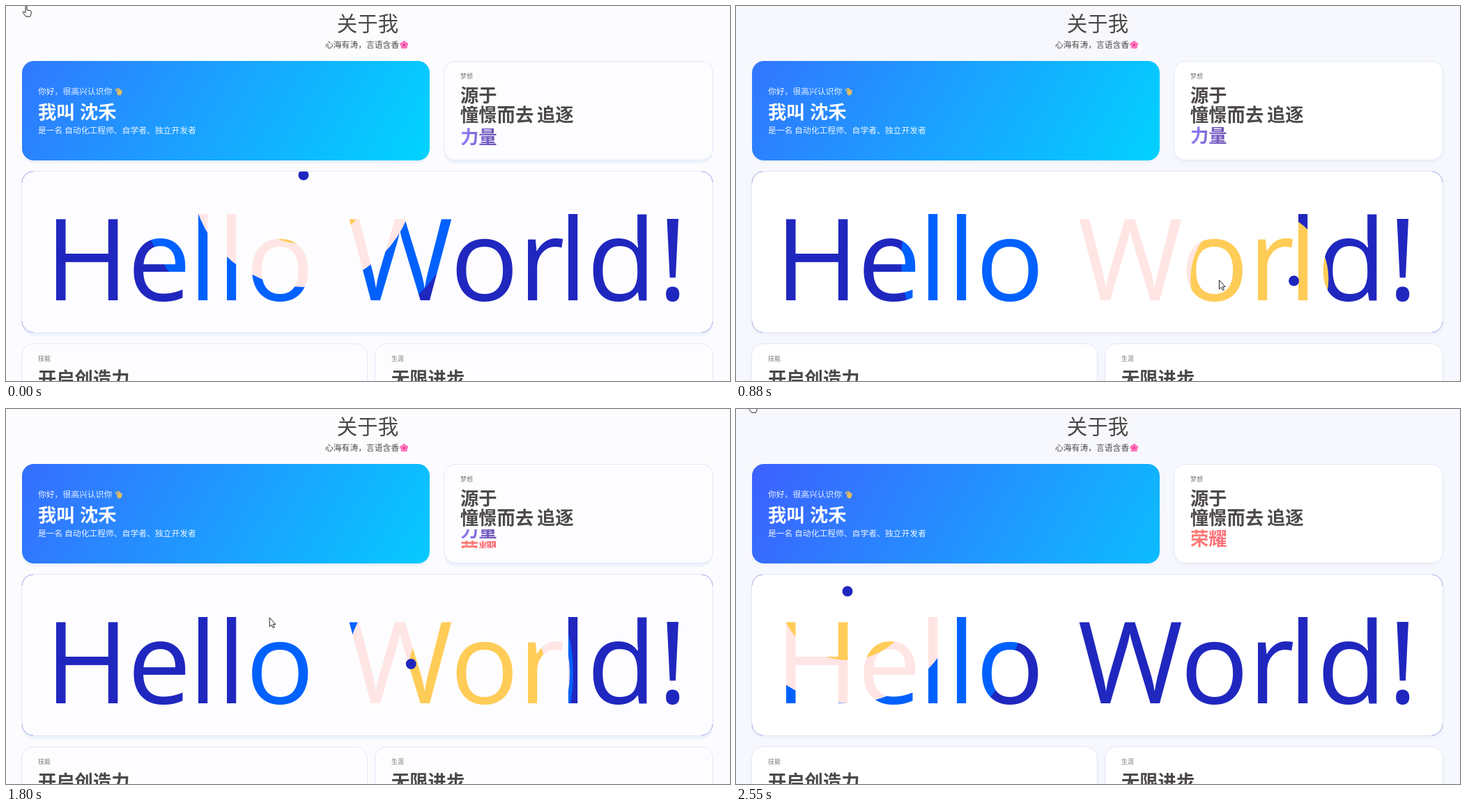
Animation of 1039 by 539 pixels, one loop 2.63 s. Source, as an HTML page:

```html
<!DOCTYPE html>
<html lang="zh-CN">
<head>
<meta charset="utf-8">
<title>关于我</title>
<style>
  html, body { margin: 0; width: 100%; height: 100%; overflow: hidden; }
  body {
    position: relative;
    background: var(--page);
    font-family: "Noto Sans CJK SC", "Noto Sans CJK", sans-serif;
    animation: tint 2630ms step-end infinite;
  }
  @keyframes tint {
    0%, 45.6% { --page: #fcfcff; --card: #fdfdff; --shade: 0 5px 2px -1px #edf2fb; }
    15.2%, 88.2%, 100% { --page: #f7f8fe; --card: #fff; --shade: 0 3px 5px -1px #eceef6; }
  }
  .card {
    position: absolute;
    box-sizing: border-box;
    border: 1px solid #e3e8f7;
    border-radius: 17px;
    background: var(--card);
    box-shadow: var(--shade);
  }
  .hero {
    border: 0;
    background: linear-gradient(120deg, #5b27ff, #00d4ff) 100% 50% / 200% 100%;
    animation: drift 2630ms cubic-bezier(.5, 0, .9, .6) infinite;
  }
  @keyframes drift { to { background-position: 68% 50%; } }

  svg { position: absolute; left: 0; top: 0; }
  .ink { fill: #4c4948; }
  .big { font-size: 26.3px; font-weight: 700; }
  .mid { font-size: 11.8px; }
  .tip { font-size: 9px; fill: #7a7877; }
  .hero-text { fill: #fff; }
  .hello { font: 400 163px "Open Sans", "Noto Sans", sans-serif; }
  .roll { animation: roll 2630ms infinite; }
  @keyframes roll {
    0% { transform: translateY(2.5px); animation-timing-function: ease-out; }
    4%, 65.4% { transform: none; animation-timing-function: ease-in-out; }
    68.44% { transform: translateY(-11.8px); animation-timing-function: ease-out; }
    75%, 100% { transform: translateY(-28px); }
  }
</style>
</head>
<body>
<div class="card hero" style="left:22.6px;top:79px;width:585px;height:143px"></div>
<div class="card" style="left:628px;top:79px;width:387px;height:143px"></div>
<div class="card" style="left:22px;top:237px;width:993px;height:233px"></div>
<div class="card" style="left:22px;top:485px;width:497px;height:143px"></div>
<div class="card" style="left:529px;top:485px;width:486px;height:143px"></div>

<svg width="1039" height="539" viewBox="0 0 1039 539">
  <defs>
    <linearGradient id="violet"><stop stop-color="#9184ff"/><stop offset="1" stop-color="#674bab"/></linearGradient>
    <linearGradient id="coral"><stop stop-color="#ff7d70"/><stop offset="1" stop-color="#f96b78"/></linearGradient>
    <clipPath id="letters">
      <text class="hello" y="423" x="56 174.2 262 303 344 440 490.5 637.4 735 793 833.5 935">Hello World!</text>
    </clipPath>
    <clipPath id="panel"><rect x="23" y="238" width="991" height="231" rx="17"/></clipPath>
    <clipPath id="slot"><rect x="645" y="173" width="80" height="27"/></clipPath>
  </defs>

  <g class="ink">
    <text x="519" y="36" font-size="29.5" text-anchor="middle">关于我</text>
    <text class="mid" x="458" y="60.3">心海有涛，言语含香</text>
  </g>
  <g id="flower" transform="translate(571.3 56)"><circle r="1.6" fill="#d8347f"/></g>

  <g class="hero-text">
    <text class="mid" x="46" y="127.3" opacity=".9">你好，很高兴认识你</text>
    <text class="big" x="46" y="161.8">我叫</text>
    <text class="big" x="106" y="161.8">沈禾</text>
    <text class="mid" x="46" y="183.3" opacity=".9">是一名 自动化工程师、自学者、独立开发者</text>
  </g>
  <path d="M157.5 120l3 4M159.5 118.6l3 4M162 118.8l2 3.5M165.5 121v4" fill="none"
        stroke="#e2bb62" stroke-width="1.7" stroke-linecap="round"/>
  <ellipse cx="162.6" cy="125" rx="3.2" ry="3.6" fill="#e2bb62"/>

  <text class="tip" x="652" y="103.6">梦想</text>
  <text class="tip" x="46" y="510">技能</text>
  <text class="tip" x="553" y="510">生涯</text>
  <g class="ink big">
    <text x="652" y="138">源于</text>
    <text x="652" y="166.4">憧憬而去</text>
    <text x="762" y="166.4">追逐</text>
    <text x="46" y="544.5">开启创造力</text>
    <text x="553" y="544.5">无限进步</text>
  </g>
  <g clip-path="url(#slot)">
    <g class="roll big">
      <text x="652" y="196" fill="url(#violet)">力量</text>
      <text x="652" y="224" fill="url(#coral)">荣耀</text>
    </g>
  </g>

  <path d="M23 254a16 16 0 0 1 16-16M998 238a16 16 0 0 1 16 16M1014 453a16 16 0 0 1-16 16M39 469a16 16 0 0 1-16-16"
        fill="none" stroke="#2027bf" stroke-opacity=".42" stroke-width=".8"/>
  <g clip-path="url(#letters)">
    <rect x="23" y="238" width="991" height="231" fill="#2027bf"/>
    <circle id="blue" r="238" fill="#0061ff"/>
    <circle id="pink" r="161" fill="#ffe5e3"/>
    <circle id="gold" r="99" fill="#ffcc57"/>
  </g>
  <g clip-path="url(#panel)"><circle id="dot" r="7.5" fill="#2027bf"/></g>

  <g id="cursor" fill="#fff" stroke="#222" stroke-width="1" stroke-linejoin="round">
    <path id="arrow" d="M0 0v13l3-2.6 2 4.4 2-.9-2-4.3h3.6z"/>
    <path id="hand" d="M2 .8c0-1.2 2-1.2 2 0v5l5 1c1 .2 1.5.8 1.4 1.8l-.7 4-1.2 2.6H2.6L-1.8 9.6c-.7-1 .5-2 1.5-1.2L2 9.8z"/>
    <path id="resize" d="M0-2.2h2v-1.3L6.3 0 2 3.5V2.2H0z"/>
  </g>
</svg>

<script>
const LOOP = 2630;
const el = id => document.getElementById(id);

// The pointer sweeps left, right, left, right; every circle repeats
// the same four turns with its own lag and a narrower reach.
const turnTimes = [330, 820, 1220, 1650];
const turnHeights = [355, 395, 380, 380];
const sweep = (lag, reach) => reach.map((x, i) => [turnTimes[i] + lag, x, turnHeights[i]]);
const trail = (lag, reach, end) => [[200, 427, 243], ...sweep(lag, reach), [end, 160, 262]];

const paths = {
  dot: trail(0, [306, 834, 221, 796], 2030),
  gold: trail(120, [338, 767, 367, 682], 2210),
  pink: trail(205, [278, 700, 408, 658], 2335),
  blue: trail(310, [268, 696, 480, 618], LOOP),
  cursor: [[60, 26, 0], ...sweep(-80, [112, 860, 250, 732]), [2040, 0, 37], [2500, 20, -10]]
};

// Cosine swing between stops; height follows later than the sideways move.
function pointAt(path, t) {
  const i = path.findIndex(stop => stop[0] > t);
  if (i <= 0) return path.at(i).slice(1);
  const [t0, x0, y0] = path[i - 1], [t1, x1, y1] = path[i];
  const f = (1 - Math.cos(Math.PI * (t - t0) / (t1 - t0))) / 2;
  return [x0 + (x1 - x0) * f, y0 + (y1 - y0) * f * f];
}

for (let i = 0; i < 5; i++) {
  const a = (i * 72 - 90) * Math.PI / 180;
  const petal = document.createElementNS('http://www.w3.org/2000/svg', 'circle');
  petal.setAttribute('cx', 3.4 * Math.cos(a));
  petal.setAttribute('cy', 3.4 * Math.sin(a));
  petal.setAttribute('r', 2.6);
  petal.setAttribute('fill', '#ff73bd');
  el('flower').prepend(petal);
}

let start;
function draw(now) {
  start ??= now;
  const t = (now - start) % LOOP;
  for (const id in paths)
    el(id).setAttribute('transform', `translate(${pointAt(paths[id], t)})`);
  const shape = t < 80 || t > 2280 ? 'hand' : t > 2020 ? 'resize' : 'arrow';
  for (const id of ['arrow', 'hand', 'resize'])
    el(id).style.display = id === shape ? '' : 'none';
  requestAnimationFrame(draw);
}
requestAnimationFrame(draw);
</script>
</body>
</html>
```
